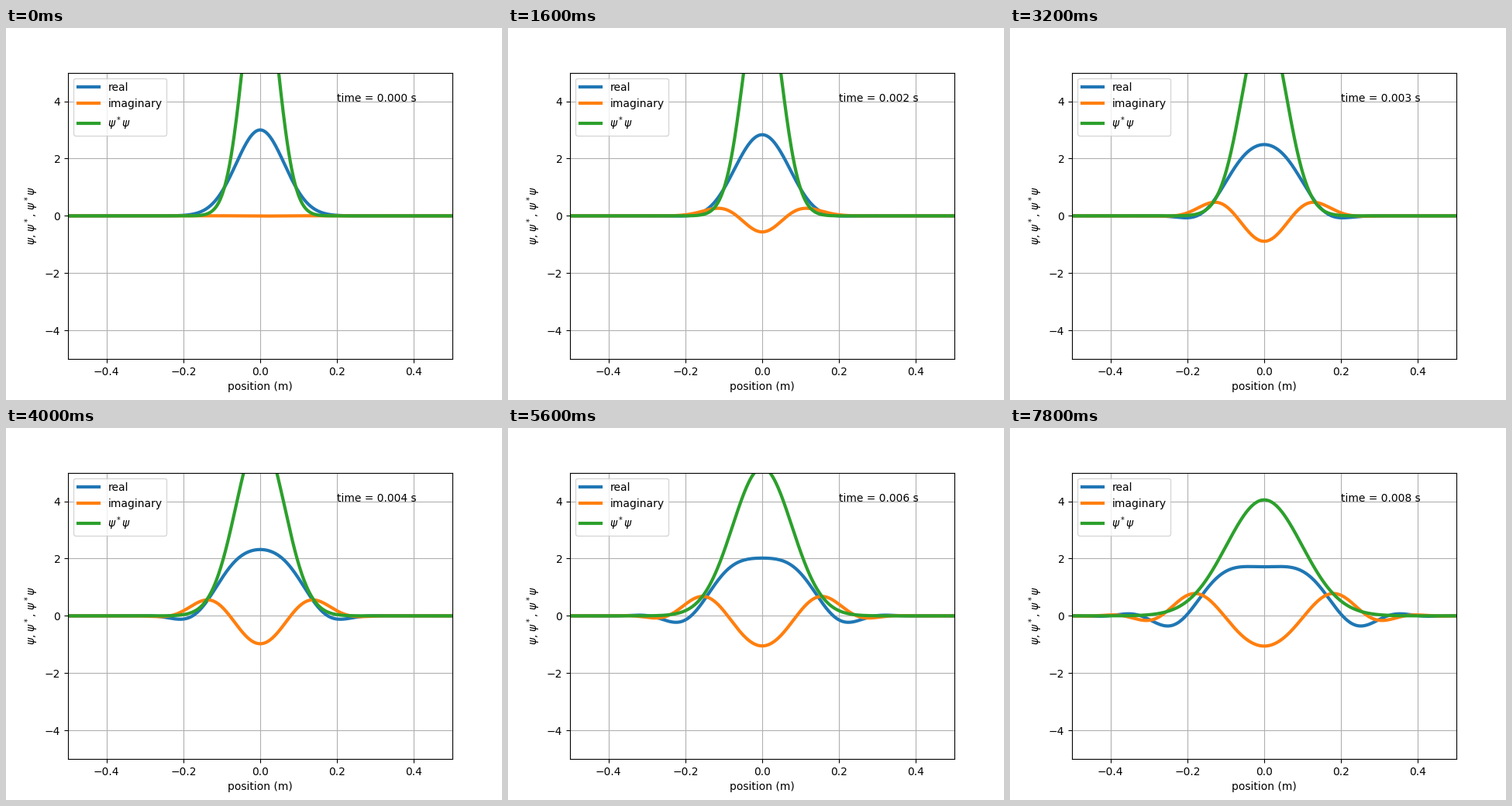
Recreate the animation shown at these times as a matplotlib script. Size 640 px wide and 480 px high, loop 8 s.

```python
import numpy as np
import matplotlib.pyplot as plt
from matplotlib.animation import FuncAnimation

FRAMES = 40
INTERVAL = 200       # ms
STEP = 2e-4          # simulated seconds per frame
LAG = 2e-5           # the imaginary part runs slightly ahead of the real part
PEAK = 3.0
SIGMA = 1 / (PEAK**2 * np.sqrt(2 * np.pi))   # unit total probability

x = np.linspace(-0.5, 0.5, 501)


def packet(t):
    """Free Gaussian wave packet at rest, with hbar = m = 1."""
    spread = 1 + 1j * t / (2 * SIGMA**2)
    return PEAK / np.sqrt(spread) * np.exp(-x**2 / (4 * SIGMA**2 * spread))


fig, ax = plt.subplots(figsize=(6.4, 4.8), dpi=100)
labels = ("real", "imaginary", r"$\psi^*\psi$")
real, imag, density = [ax.plot(x, 0 * x, lw=3, label=s)[0] for s in labels]
clock = ax.text(0.2, 4, "")

ax.set_xlim(-0.5, 0.5)
ax.set_ylim(-5, 5)
ax.set_xlabel("position (m)")
ax.set_ylabel(r"$\psi$, $\psi^*$, $\psi^*\psi$")
ax.grid()
ax.legend(loc="upper left")


def update(i):
    t = i * STEP
    psi = packet(t)
    real.set_ydata(psi.real)
    imag.set_ydata(packet(t + LAG).imag)
    density.set_ydata(np.abs(psi)**2)
    clock.set_text(f"time = {t:.3f} s")
    return real, imag, density, clock


anim = FuncAnimation(fig, update, frames=FRAMES, interval=INTERVAL,
                     init_func=lambda: update(0), repeat=True, repeat_delay=0)
plt.show()
```
